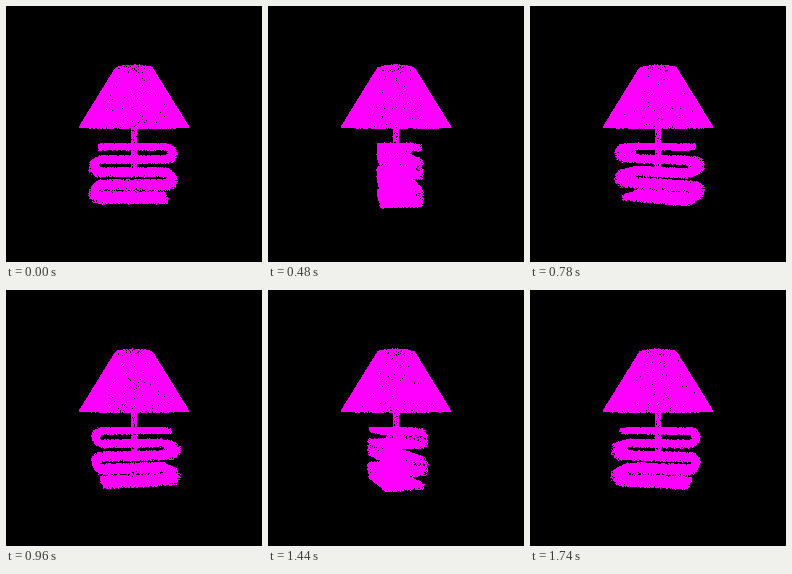
An HTML page with a canvas that plays this animation: 256x256 px, repeating every 1.8 s.

```html
<!DOCTYPE html>
<html lang="en">
<head>
<meta charset="utf-8">
<title>Rotating lamp</title>
<style>
html, body { margin: 0; width: 100%; height: 100%; overflow: hidden; background: #000; }
canvas { display: block; width: 100%; height: 100%; image-rendering: pixelated; }
</style>
</head>
<body>
<canvas id="stage" width="256" height="256"></canvas>
<script>
const SIZE = 256, MID = 128, CAMERA = 307;
const LOOP = 1800, STEP = 60;
const MAGENTA = 0xffff00ff, BLACK = 0xff000000;

const ctx = document.getElementById('stage').getContext('2d');
const image = ctx.createImageData(SIZE, SIZE);
const pixels = new Uint32Array(image.data.buffer);

let seed = 7;
function random() {
  seed = (seed + 0x6d2b79f5) | 0;
  let n = Math.imul(seed ^ (seed >>> 15), 1 | seed);
  n = (n + Math.imul(n ^ (n >>> 7), 61 | n)) ^ n;
  return ((n ^ (n >>> 14)) >>> 0) / 4294967296;
}
const between = (a, b) => a + (b - a) * random();

// Points are [x, y, z] around the axis, y pointing down from eye level.
const points = [];
function scatter(count, place) {
  for (let i = 0; i < count; i++) points.push(place());
}
function ring(radius, y) {
  const a = between(0, 2 * Math.PI);
  return [radius * Math.cos(a), y, radius * Math.sin(a)];
}

function shade() {
  const top = 18.6, bottom = 54.1;
  const r = Math.sqrt(between(top * top, bottom * bottom));
  return ring(r, -65 + 58.6 * (r - top) / (bottom - top));
}

const stem = () => ring(3, between(-6, 38));

// Five stacked bars joined by half-circle bends on alternating sides.
function ribbon() {
  const left = -34, right = 32, first = 12.6, gap = 12.6;
  const row = Math.floor(random() * 5);
  const y = first + row * gap;
  const offset = between(-2.8, 2.8), z = between(-17.5, 20);
  if (row === 4 || random() < 0.8) return [between(left, right), y + offset, z];
  const a = between(-Math.PI / 2, Math.PI / 2);
  const r = gap / 2 + offset;
  const bend = r * Math.cos(a);
  return [row % 2 ? left - bend : right + bend, y + gap / 2 + r * Math.sin(a), z];
}

scatter(25000, shade);
scatter(550, stem);
scatter(26000, ribbon);

function draw(angle) {
  const c = Math.cos(angle), s = Math.sin(angle);
  pixels.fill(BLACK);
  for (const [x, y, z] of points) {
    const scale = CAMERA / (CAMERA - (z * c - x * s));
    const px = Math.floor(MID + (x * c + z * s) * scale);
    const py = Math.floor(MID + y * scale);
    pixels[py * SIZE + px] = MAGENTA;
  }
  ctx.putImageData(image, 0, 0);
}

let shown = -1;
function tick() {
  const step = Math.floor(performance.now() % LOOP / STEP);
  if (step !== shown) {
    shown = step;
    draw(step * STEP / LOOP * 2 * Math.PI);
  }
  requestAnimationFrame(tick);
}
tick();
</script>
</body>
</html>
```
